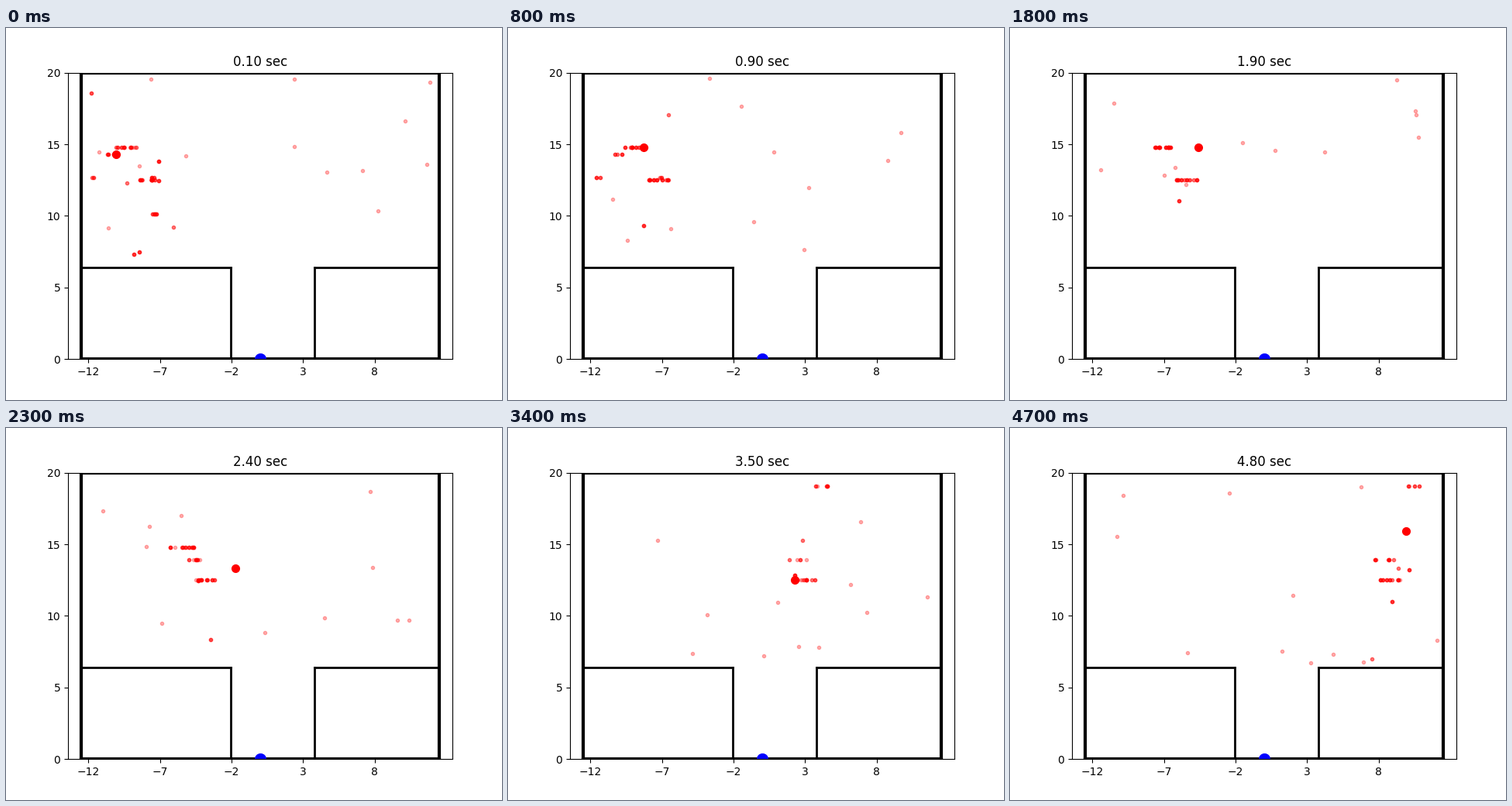
A matplotlib script for the animation above (4.8 s loop, 640 by 480 pixels).

```python
import numpy as np
import matplotlib.pyplot as plt
from matplotlib.animation import FuncAnimation

STEPS, INTERVAL = 48, 100
W, H = 12.5, 20.0

# Key steps, swarm centre, estimate x; the estimate jumps in height
KEYS = [0, 4, 12, 23, 29, 40, 47]
CENTRE = [-8.4, -8.0, -7.9, -4.5, 0.0, 5.0, 8.2]
EST_X = [-10.07, -8.5, -8.05, -1.72, .18, 4.82, 9.9]
JUMPS = [0, 2, 21, 25, 45]
EST_Y = [14.3, 14.8, 13.3, 12.5, 15.9]

# Surviving families: height, first and last step, lag to centre, spread, count
ROWS = [
    (18.57, 0, 6, -3.4, 0, 1),
    (14.8, 0, 29, -.9, .9, 10),
    (14.3, 0, 13, -2.1, .3, 3),
    (12.7, 0, 8, -3.4, .25, 2),
    (12.7, 0, 8, .9, .1, 2),
    (12.5, 0, 47, .7, .8, 9),
    (10.15, 0, 6, 1.2, .4, 4),
    (13.9, 22, 47, .2, .7, 5),
    (18.4, 26, 31, -1.6, .2, 3),
    (19.05, 28, 47, 2.0, .6, 4),
]


def make_loners():
    """Short-lived particles: height, first step, last step, lag."""
    rng = np.random.default_rng(7)
    born = np.append(np.zeros(8, int), rng.integers(1, STEPS, 36))
    n = born.size
    return list(zip(np.clip(rng.normal(13, 3, n), 7, 19.6), born,
                    born + rng.integers(1, 5, n), rng.normal(0, 2, n)))


LONERS = make_loners()


def particles(k):
    rng = np.random.default_rng(100 + k)
    centre = np.interp(k, KEYS, CENTRE)
    x = rng.uniform(-12.3, 12.3, 11)
    y = rng.uniform(6.7, 19.6, 11)
    families = ROWS + [(*loner, 0, 1) for loner in LONERS]
    for height, first, last, lag, spread, n in families:
        if first <= k <= last:
            spots = centre + lag + rng.uniform(-spread, spread, n)
            # resampling leaves several copies on the same spot
            spots = np.repeat(spots, rng.integers(1, 6, n))
            x = np.append(x, spots)
            y = np.append(y, np.full(spots.size, height))
    inside = np.abs(x) < 12.4
    return x[inside], y[inside]


def estimate(k):
    row = np.searchsorted(JUMPS, k, side="right") - 1
    return np.interp(k, KEYS, EST_X), EST_Y[row]


fig, ax = plt.subplots(figsize=(6.4, 4.8), dpi=100)
half = H / 2 * 496 / 369.6
ax.set(xlim=(-half, half), ylim=(0, H),
       xticks=range(-12, 9, 5), yticks=range(0, 21, 5))


def wall(xs, ys, lw):
    ax.plot(xs, ys, color="k", lw=lw)


for side in (-W, W):
    wall([side, side], [0, H], 3)
for level in (0, H):
    wall([-W, W], [level, level], 3)
for corner, side in ((-2.04, -W), (3.8, W)):
    wall([side, corner], [6.4, 6.4], 2)
    wall([corner, corner], [0, 6.4], 2)

ax.plot(0, 0, "bo", ms=10)
cloud, = ax.plot([], [], "ro", ms=3, alpha=.3)
best, = ax.plot([], [], "ro", ms=7)
title = ax.set_title("")


def update(k):
    cloud.set_data(*particles(k))
    x, y = estimate(k)
    best.set_data([x], [y])
    title.set_text(f"{(k + 1) / 10:.2f} sec")
    return cloud, best, title


anim = FuncAnimation(fig, update, frames=STEPS, interval=INTERVAL,
                     init_func=lambda: update(0), repeat=True, repeat_delay=0)
plt.show()
```
